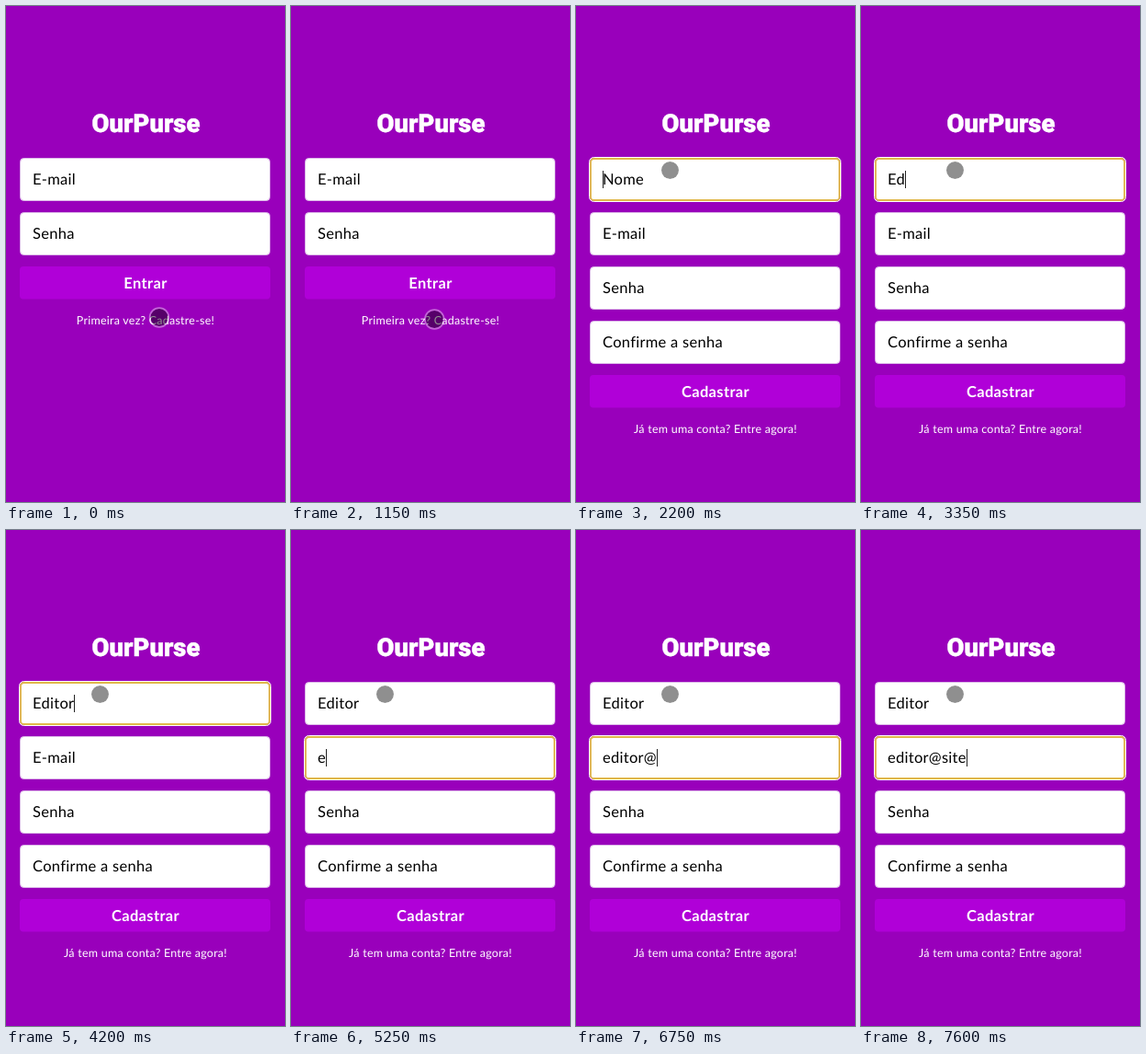
These frames come from a looping animation (304x539 px, 8000 ms). An HTML page:

```html
<!DOCTYPE html>
<html lang="pt-BR">
<head>
<meta charset="utf-8">
<title>Cadastro</title>
<style>
  html, body { margin: 0; width: 100%; height: 100%; overflow: hidden; background: #9900bb; }
  svg { display: block; width: 100vw; height: 100vh; }
  text { font-family: Lato, "Open Sans", sans-serif; white-space: pre; text-rendering: geometricPrecision; }
  .brand { font: 900 27.5px Roboto, Inter, sans-serif; fill: #fff; stroke: #fff; stroke-width: .5; text-anchor: middle; }
  .value { font-size: 16.5px; letter-spacing: .28px; fill: #000; }
  .action { font-size: 16.5px; font-weight: 700; letter-spacing: .35px; fill: #fff; text-anchor: middle; }
  .link { font-size: 12.5px; letter-spacing: .23px; fill: #fff; text-anchor: middle; }
</style>
</head>
<body>
<svg id="stage" viewBox="0 0 304 539" xmlns="http://www.w3.org/2000/svg"></svg>
<script>
const LOOP = 8000;
const SIGNUP_OPENS = 1550;
const NAME_FOCUSED = 2200;
const EMAIL_FOCUSED = 4450;
const FIELD = { x: 15, top: 165, width: 273, height: 47, pitch: 59.2 };
const stage = document.getElementById('stage');

function add(parent, tag, attrs = {}, content = '') {
  const node = document.createElementNS('http://www.w3.org/2000/svg', tag);
  for (const key in attrs) node.setAttribute(key, attrs[key]);
  node.textContent = content;
  return parent.appendChild(node);
}

// Rounded rectangle that lies `inset` pixels inside the field's edge.
function addFrame(parent, top, inset, attrs) {
  return add(parent, 'rect', {
    x: FIELD.x + inset, y: top + inset,
    width: FIELD.width - 2 * inset, height: FIELD.height - 2 * inset,
    rx: 4.5 - inset, ...attrs
  });
}

const show = (node, visible) => node.setAttribute('visibility', visible ? 'visible' : 'hidden');
const clamp = value => Math.max(0, Math.min(1, value));
const mix = (a, b, amount) => a + (b - a) * amount;
const rowOffset = index => FIELD.top + index * FIELD.pitch;
const rowTop = index => Math.floor(rowOffset(index));

function addForm(labels, action, link) {
  const form = add(stage, 'g');
  const values = labels.map((label, i) => {
    addFrame(form, rowTop(i), .5, { fill: '#fff', stroke: '#dcb8e8' });
    return add(form, 'text', { class: 'value', x: 29, y: Math.round(rowOffset(i) + 28.8) }, label);
  });
  const top = rowTop(labels.length);
  add(form, 'rect', { x: FIELD.x, y: top, width: FIELD.width, height: 35.5, rx: 4, fill: '#b000d8' });
  add(form, 'text', { class: 'action', x: 152, y: top + 23.5 }, action);
  add(form, 'text', { class: 'link', x: 152, y: top + 62.8 }, link);
  return { form, labels, values };
}

add(stage, 'rect', { width: 304, height: 539, fill: '#9900bb' });
add(stage, 'text', { class: 'brand', x: 152.5, y: 137 }, 'OurPurse');
const login = addForm(['E-mail', 'Senha'], 'Entrar', 'Primeira vez? Cadastre-se!');
const signup = addForm(['Nome', 'E-mail', 'Senha', 'Confirme a senha'], 'Cadastrar', 'Já tem uma conta? Entre agora!');

const focus = add(stage, 'g');
addFrame(focus, 0, -.5, { fill: 'none', stroke: '#fff' });
addFrame(focus, 0, 1, { fill: 'none', stroke: '#e0b84a', 'stroke-width': 1.8 });
const caret = add(focus, 'rect', { y: 14, width: 1, height: 19, fill: '#222' });

const pointer = add(stage, 'g');
add(pointer, 'circle', { r: 9.5, fill: '#000', 'fill-opacity': .44 });
add(pointer, 'circle', { r: 10.4, fill: 'none', stroke: '#fff', 'stroke-opacity': .4, 'stroke-width': 1.7 });

// Bursts of even typing, grouped by field.
const typing = [
  [{ text: 'Editor', from: 3000, to: 4200 }],
  [{ text: 'editor', from: 5250, to: 6150 }, { text: '@site', from: 6700, to: 7600 }]
];

function typedPart({ text, from, to }, time) {
  if (time < from) return '';
  return text.slice(0, 1 + Math.floor((text.length - 1) * clamp((time - from) / (to - from))));
}

// A slow drift over the link, then a jump in four even steps to the first field.
function pointerAt(time) {
  const drift = clamp(time / 1150);
  const jump = clamp(Math.floor((time - 1650) / 100) / 4);
  return [mix(mix(167, 156.3, drift), 102.5, jump), mix(mix(338.5, 340.5, drift), 178.5, jump)];
}

function render(time) {
  show(login.form, time < SIGNUP_OPENS);
  show(signup.form, time >= SIGNUP_OPENS);

  const typed = typing.map(bursts => bursts.map(burst => typedPart(burst, time)).join(''));
  typed.forEach((text, i) => { signup.values[i].textContent = text || signup.labels[i]; });

  const active = time < EMAIL_FOCUSED ? 0 : 1;
  const typedWidth = typed[active] ? signup.values[active].getComputedTextLength() : 0;
  show(focus, time >= NAME_FOCUSED);
  focus.setAttribute('transform', `translate(0 ${rowTop(active)})`);
  caret.setAttribute('x', Math.round(29 + typedWidth));

  pointer.setAttribute('transform', `translate(${pointerAt(time)})`);
  show(pointer, time < 6550 || time >= 6750);
}

const began = performance.now();
function tick() {
  render((performance.now() - began) % LOOP);
  requestAnimationFrame(tick);
}
tick();
</script>
</body>
</html>
```
